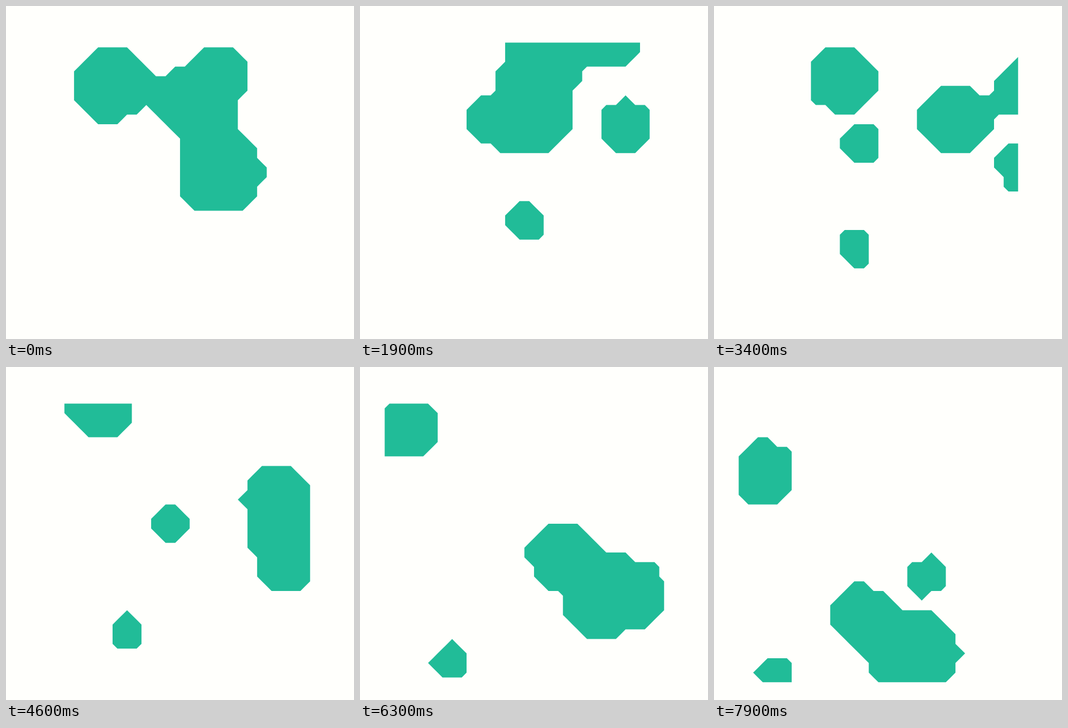
Animation, 640 px wide and 614 px high, one loop 8 s. Source, as an HTML page with a canvas:

```html
<!DOCTYPE html>
<html lang="en">
<head>
<meta charset="utf-8">
<title>Metaballs</title>
<style>
  html, body { margin: 0; width: 100%; height: 100%; overflow: hidden; background: #fffffc; }
  canvas { display: block; }
</style>
</head>
<body>
<canvas id="stage" width="640" height="614"></canvas>
<script>
const ctx = document.getElementById('stage').getContext('2d');
const LOOP = 8000, STEP = 100;
const CELLS = 29, SIZE = 17.72, LEFT = 45.4, TOP = 67.4;

// Start, velocity per second and squared radius, all in grid cells.
const balls = [
  { x: 20.58, y: 13.5, vx: -2.93, vy: -2.87, r2: 10.5 },
  { x: 8.2, y: 3.9, vx: 4.1, vy: -4.07, r2: 9.7 },
  { x: 16.8, y: 6.45, vx: 3.88, vy: -3.85, r2: 6.7 },
  { x: 19.7, y: 3.25, vx: 2.95, vy: 2.93, r2: 5.4 },
  { x: 7.65, y: 5.35, vx: 1.52, vy: 1.57, r2: 2.5 },
  { x: 18.29, y: 15.2, vx: -1.84, vy: 1.84, r2: 3 }
];

// Fold a straight path back and forth between two walls.
function bounce(p, min, max) {
  const span = max - min;
  const q = (((p - min) % (2 * span)) + 2 * span) % (2 * span);
  return min + (q > span ? 2 * span - q : q);
}

// Marching squares with every crossing at the middle of its edge.
function draw(t) {
  const now = balls.map(b => ({
    x: bounce(b.x + b.vx * t, 0, 30),
    y: bounce(b.y + b.vy * t, -1, 29),
    r2: b.r2
  }));
  const inside = (x, y) =>
    now.reduce((sum, b) => sum + b.r2 / ((x - b.x) ** 2 + (y - b.y) ** 2 + 1e-6), 0) > 1;

  const grid = [];
  for (let y = 0; y <= CELLS; y++) {
    grid.push(Array.from({ length: CELLS + 1 }, (_, x) => inside(x, y)));
  }

  ctx.fillStyle = '#fffffc';
  ctx.fillRect(0, 0, 640, 614);
  ctx.fillStyle = '#21bc98';
  ctx.beginPath();
  for (let y = 0; y < CELLS; y++) {
    for (let x = 0; x < CELLS; x++) addCell(grid, x, y);
  }
  ctx.fill();
}

function addCell(grid, x, y) {
  const corners = [[x, y], [x + 1, y], [x + 1, y + 1], [x, y + 1]];
  const points = [];
  corners.forEach(([ax, ay], i) => {
    const [bx, by] = corners[(i + 1) % 4];
    if (grid[ay][ax]) points.push([ax, ay]);
    if (grid[ay][ax] !== grid[by][bx]) points.push([(ax + bx) / 2, (ay + by) / 2]);
  });
  if (!points.length) return;
  points.forEach(([px, py], i) =>
    ctx[i ? 'lineTo' : 'moveTo'](LEFT + px * SIZE, TOP + py * SIZE));
  ctx.closePath();
}

const start = performance.now();
function tick() {
  const ms = (performance.now() - start) % LOOP;
  draw(Math.floor(ms / STEP) * STEP / 1000);
  requestAnimationFrame(tick);
}
tick();
</script>
</body>
</html>
```
